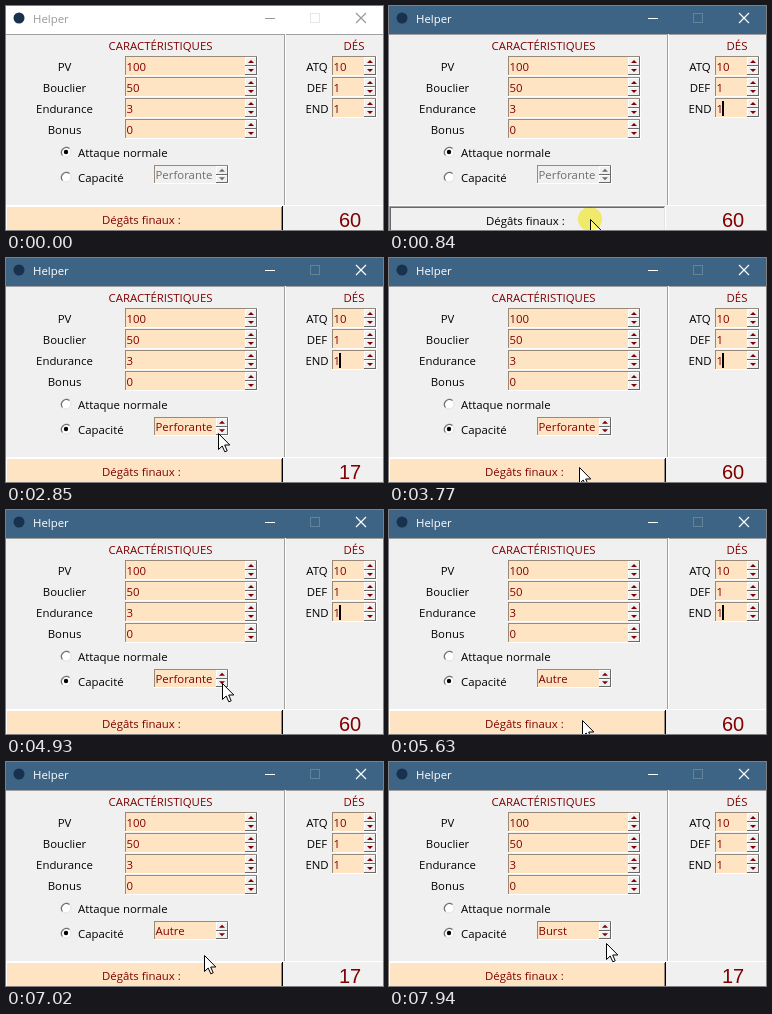
Write an HTML page that moves like this. It is 377 px wide and 224 px high and loops after 8 s.

```html
<!DOCTYPE html>
<html lang="fr">
<head>
<meta charset="utf-8">
<title>Helper</title>
<style>
  html, body { margin: 0; width: 377px; height: 224px; overflow: hidden; background: #f0f0f0; }
  svg { display: block; }
  text { font: 11.4px "Open Sans", "Noto Sans", sans-serif; fill: #000; white-space: pre; }
  .red { fill: #800000; }
  .mid { text-anchor: middle; }
  #result { font: 20px "Liberation Sans", Arial, sans-serif; }
  rect, .crisp { shape-rendering: crispEdges; }
  .off .field { fill: #f0f0f0; }
  .off .red { fill: #6d6d6d; }
  #halo { mix-blend-mode: multiply; }
</style>
</head>
<body>
<svg id="stage" width="377" height="224" viewBox="0 0 377 224"></svg>
<script>
const LOOP = 8000, STEP = 76;
const PEACH = '#ffe4c4', SHADE = '#998978', FACE = '#f0f0f0';

const rect = (x, y, w, h, fill, more = '') =>
  `<rect x="${x}" y="${y}" width="${w}" height="${h}" fill="${fill}" ${more}/>`;
const label = (x, y, str, cls = '', id = '') =>
  `<text x="${x}" y="${y}" class="${cls}" ${id && `id="${id}"`}>${str}</text>`;

// Two-tone frame: first colour on top and left, second on bottom and right.
const bevel = (x, y, w, h, a, b) =>
  rect(x, y, w, 1, a) + rect(x, y, 1, h, a) +
  rect(x, y + h - 1, w, 1, b) + rect(x + w - 1, y, 1, h, b);

function arrow(x, y, h, dir) {
  const cx = x + 6, cy = y + h / 2;
  return rect(x, y, 12, h, FACE) + bevel(x, y, 12, h, '#fff', '#696969') +
    `<path class="red" d="M${cx - 3} ${cy + 1.5 * dir}h6l-3 ${-3 * dir}z"/>`;
}

function spin(x, y, w, h, value, id = '') {
  const half = (h - 2) / 2, bx = x + w - 13;
  return rect(x, y, w, h, PEACH, 'class="field"') +
    bevel(x, y, w, h, SHADE, '#fff') +
    arrow(bx, y + 1, half, 1) + arrow(bx, y + 1 + half, half, -1) +
    label(x + 1.5, y + h / 2 + 4.5, value, 'red', id);
}

const radio = (x, y, id) =>
  `<circle cx="${x}" cy="${y}" r="5" fill="#fff" stroke="#e3e3e3"/>
   <path d="M${x - 3.5} ${y + 3.5}A5 5 0 0 1 ${x + 3.5} ${y - 3.5}" fill="none" stroke="#707070" stroke-width="1.2"/>
   <circle id="${id}" cx="${x}" cy="${y}" r="2.2"/>`;

const row = (i, cx, name, x, w, value) =>
  label(cx, 65 + 21 * i, name, 'mid') + spin(x, 50 + 21 * i, w, 20, value);

// Push button cut off by the lower edge of the stage.
const button = (id, fill, outer, inner) =>
  `<g id="${id}">${rect(0, 200, 277, 30, fill)}${bevel(0, 200, 277, 30, ...outer)}${bevel(1, 201, 275, 28, ...inner)}</g>`;

const stats = [['PV', 100], ['Bouclier', 50], ['Endurance', 3], ['Bonus', 0]];
const dice = [['ATQ', 10], ['DEF', 1], ['END', 1]];

stage.innerHTML =
  rect(0, 0, 377, 224, FACE) +
  rect(0, 0, 377, 28, '#fff', 'id="bar"') +
  rect(0, 28, 377, 1, '#a0a0a0') +
  '<circle cx="13" cy="12" r="5.5" fill="#17314f"/>' +
  label(27, 17, 'Helper', '', 'caption') +
  `<g id="controls" fill="none" stroke="#999">
     <path class="crisp" d="M259 12.5h10"/>
     <path id="maxi" class="crisp" d="M304.5 7.5h9v9h-9z"/>
     <path d="M350 7l10 10m0-10l-10 10" stroke-width="1.2"/>
   </g>` +
  label(154.5, 44, 'CARACTÉRISTIQUES', 'red mid') + label(348, 44, 'DÉS', 'red mid') +
  stats.map(([n, v], i) => row(i, 58.5, n, 119, 133, v)).join('') +
  dice.map(([n, v], i) => row(i, 311, n, 326, 45, v)).join('') +
  rect(333, 95, 2, 15, '#000', 'id="caret"') +
  radio(60, 146, 'dotNormal') + label(72, 151, 'Attaque normale') +
  radio(60, 171, 'dotSkill') + label(72, 176, 'Capacité') +
  `<g id="skill">${spin(148, 159, 75, 19, 'Perforante', 'skillName')}</g>` +
  rect(278, 28, 1, 171, '#a0a0a0') + rect(279, 28, 1, 171, '#fff') +
  rect(0, 199, 377, 1, '#fff') +
  button('up', PEACH, ['#fff', '#000'], [PEACH, SHADE]) +
  button('down', FACE, ['#a0a0a0', '#fff'], ['#696969', '#e3e3e3']) +
  label(96, 218, 'Dégâts finaux :', '', 'action') +
  label(333, 221, '60', 'red', 'result') +
  `<g id="pointer">
     <path d="M.5 .5V16.5L4.2 13L6.8 18.8L9.2 17.8L6.7 12H11.8Z" fill="#fff" stroke="#000"/>
   </g>
   <circle id="halo" r="12" fill="#fff870"/>`;

const $ = id => document.getElementById(id);
const show = (id, on) => $(id).setAttribute('visibility', on ? 'visible' : 'hidden');
const fill = (id, color) => { $(id).style.fill = color; };
const move = (id, x, y) => $(id).setAttribute('transform', `translate(${x} ${y})`);

// Pointer moves: start time, number of steps, target x, target y.
const moves = [
  [0, 1, 206, 236], [300, 1, 205, 221], [530, 5, 201, 213], [1070, 1, 203, 226],
  [1620, 7, 112, 172], [2390, 7, 212, 175], [2930, 2, 205, 207], [3230, 3, 190, 209],
  [4000, 3, 213, 170], [4320, 5, 216, 169], [4930, 1, 216, 173], [5320, 5, 193, 210],
  [5780, 5, 215, 177], [6240, 2, 217, 175], [6390, 1, 208, 226], [6640, 2, 195, 211],
  [6950, 3, 201, 178], [7250, 5, 217, 175], [7940, 1, 217, 181]
];
const actionClicks = [840, 3690, 6790];
const otherClicks = [2230, 5010, 7710];
const results = [[0, '60'], [920, '17'], [3770, '60'], [6870, '17']];
const skills = [[0, 'Perforante'], [5010, 'Autre'], [7710, 'Burst']];

const latest = (table, t) => table.findLast(([at]) => at <= t)[1];
const pressed = (clicks, t) => clicks.some(at => t >= at && t < at + 80);

function pointerAt(t) {
  const i = moves.findLastIndex(m => m[0] <= t);
  const [at, n, x, y] = moves[i];
  const [, , px, py] = moves[Math.max(i - 1, 0)];
  const u = Math.min(Math.floor((t - at) / STEP) + 1, n) / n;
  const e = u * (2 - u);
  return [Math.round(px + (x - px) * e), Math.round(py + (y - py) * e)];
}

function draw(t) {
  const active = t >= 840, skillOn = t >= 2310;
  fill('bar', active ? '#3e6485' : '#fff');
  fill('caption', active ? '#fff' : '#999');
  $('controls').style.stroke = active ? '#fff' : '#999';
  $('maxi').style.stroke = active ? '#63829c' : '#e6e6e6';
  // Caret blinks 600 ms on, 300 ms off.
  show('caret', active && (t - 830) % 900 < 600);

  show('dotNormal', !skillOn);
  show('dotSkill', skillOn);
  $('skill').setAttribute('class', skillOn ? '' : 'off');
  $('skillName').textContent = latest(skills, t);

  const hit = pressed(actionClicks, t);
  show('up', !hit);
  show('down', hit);
  fill('action', hit ? '#000' : '#800000');
  move('action', +hit, +hit);
  $('result').textContent = latest(results, t);

  const [x, y] = pointerAt(t);
  move('pointer', x, y);
  move('halo', x, y);
  show('halo', hit || pressed(otherClicks, t));
}

const start = performance.now();
function tick() {
  draw((performance.now() - start) % LOOP);
  requestAnimationFrame(tick);
}
tick();
</script>
</body>
</html>
```
